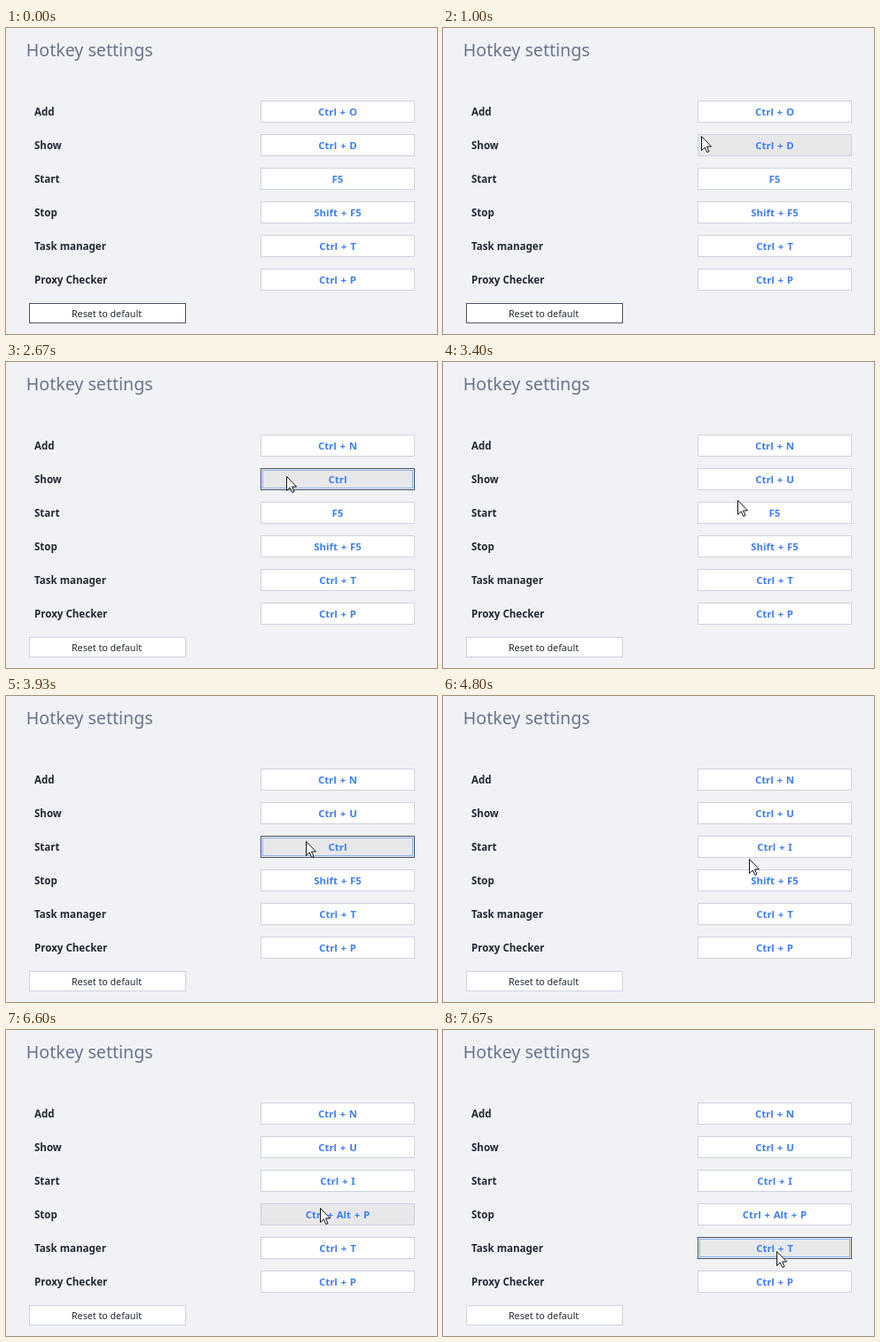
Animation of 486 by 346 pixels, one loop 8 s. Source, as an HTML page:

```html
<!DOCTYPE html>
<html lang="en">
<head>
<meta charset="utf-8">
<title>Hotkey settings</title>
<style>
  html, body { margin: 0; width: 100%; height: 100%; overflow: hidden; background: #f1f2f6; }
  svg { display: block; width: 486px; height: 346px; }
  text { font-family: "Noto Sans", "Open Sans", sans-serif; }
  .title { font-size: 19.6px; fill: #68748b; }
  .label, .key { font-weight: 700; }
  .label { font-size: 11.55px; fill: #222933; }
  .key { font-size: 11.4px; fill: #3e7ef2; text-anchor: middle; word-spacing: .8px; }
  .reset { font-size: 10.7px; fill: #222933; text-anchor: middle; }
  .dots { fill: none; stroke: #2f80ee; stroke-dasharray: 1 1; }
</style>
</head>
<body>
<svg id="stage" viewBox="0 0 486 346">
  <rect width="486" height="346" fill="#f1f2f6"/>
  <text class="title" x="22.8" y="32">Hotkey settings</text>
</svg>
<script>
const LOOP = 8000, FPS = 15;
const LIGHT = '#cdd2df', DARK = '#4d5565', HOVER = '#e8e8eb';
const BOX = { x: 287, y: 82, w: 174, h: 25, step: 38 };

// focus: time span in ms; typed: text shown from each time on
const rows = [
  { label: 'Add', key: 'Ctrl + O', focus: [1400, 2070], typed: { 1530: 'Ctrl', 1870: 'Ctrl + N' } },
  { label: 'Show', key: 'Ctrl + D', focus: [2400, 3270], typed: { 2670: 'Ctrl', 3070: 'Ctrl + U' } },
  { label: 'Start', key: 'F5', focus: [3670, 4670], typed: { 3930: 'Ctrl', 4400: 'Ctrl + I' } },
  { label: 'Stop', key: 'Shift + F5', focus: [5200, 6600],
    typed: { 5530: 'Ctrl', 6200: 'Ctrl + Alt', 6330: 'Ctrl + Alt + P' } },
  { label: 'Task manager', key: 'Ctrl + T', focus: [7670, LOOP] },
  { label: 'Proxy Checker', key: 'Ctrl + P' }
];

// Pointer glides from its last place, bent towards `via`; times in ticks
const entry = [296, 346];
const glides = [
  { from: 0, to: 13, via: [215, 245], end: [268, 162], power: 1 },
  { from: 13, to: 18, via: [278, 131], end: [313, 99] },
  { from: 30, to: 33, via: [315, 114], end: [316, 129] },
  { from: 49, to: 54, via: [331, 156], end: [338, 164] },
  { from: 70, to: 76, via: [342, 181], end: [354, 201] },
  { from: 104, to: 109, via: [364, 224], end: [375, 249] },
  { from: 111, to: 114, via: [376, 249], end: [376, 250] }
];

const stage = document.getElementById('stage');

function add(tag, attrs, text = '') {
  const el = document.createElementNS('http://www.w3.org/2000/svg', tag);
  for (const name in attrs) el.setAttribute(name, attrs[name]);
  el.textContent = text;
  return stage.appendChild(el);
}

function outline(x, y, w, h, attrs) {
  return add('rect', { x: x + .5, y: y + .5, width: w - 1, height: h - 1, ...attrs });
}

rows.forEach((row, i) => {
  row.y = BOX.y + i * BOX.step;
  add('text', { class: 'label', x: 32, y: row.y + 17 }, row.label);
  row.box = outline(BOX.x, row.y, BOX.w, BOX.h, {});
  row.dots = outline(BOX.x + 2, row.y + 2, BOX.w - 4, BOX.h - 4, { class: 'dots' });
  row.text = add('text', { class: 'key', x: 374, y: row.y + 17 });
});
const reset = outline(26, 311, 177, 23, { fill: '#fff' });
add('text', { class: 'reset', x: 113.5, y: 327 }, 'Reset to default');
const pointer = add('path', {
  d: 'M.5 .5V16.5L4.2 13 6.8 18.5 9 17.5 6.5 12H11.5Z',
  fill: '#fff', stroke: '#111'
});

// Tip of the pointer; it moves in whole ticks and pixels
function tipAt(t) {
  const tick = Math.floor((t + 4) * FPS / 1000);
  let p = entry;
  for (const { from, to, via, end, power = 2 } of glides) {
    if (tick < from) break;
    const u = Math.min(1, (tick - from) / (to - from));
    const v = (1 - u) ** power, e = 1 - v;
    p = p.map((a, i) => Math.round(a * v * v + 2 * via[i] * e * v + end[i] * e * e));
  }
  return p;
}

function keyAt(row, t) {
  let text = row.key;
  for (const time in row.typed) if (t >= time) text = row.typed[time];
  return text;
}

function draw(t) {
  const [px, py] = tipAt(t);
  for (const row of rows) {
    const active = row.focus && t >= row.focus[0] && t < row.focus[1];
    const over = px >= BOX.x && px < BOX.x + BOX.w && py >= row.y && py < row.y + BOX.h;
    row.box.setAttribute('fill', over ? HOVER : '#fff');
    row.box.setAttribute('stroke', active ? DARK : LIGHT);
    row.dots.setAttribute('visibility', active ? 'visible' : 'hidden');
    row.text.textContent = keyAt(row, t);
  }
  reset.setAttribute('stroke', t < rows[0].focus[0] ? DARK : LIGHT);
  pointer.setAttribute('transform', `translate(${px} ${py})`);
}

const start = performance.now();
function frame() {
  draw((performance.now() - start) % LOOP);
  requestAnimationFrame(frame);
}
frame();
</script>
</body>
</html>
```
